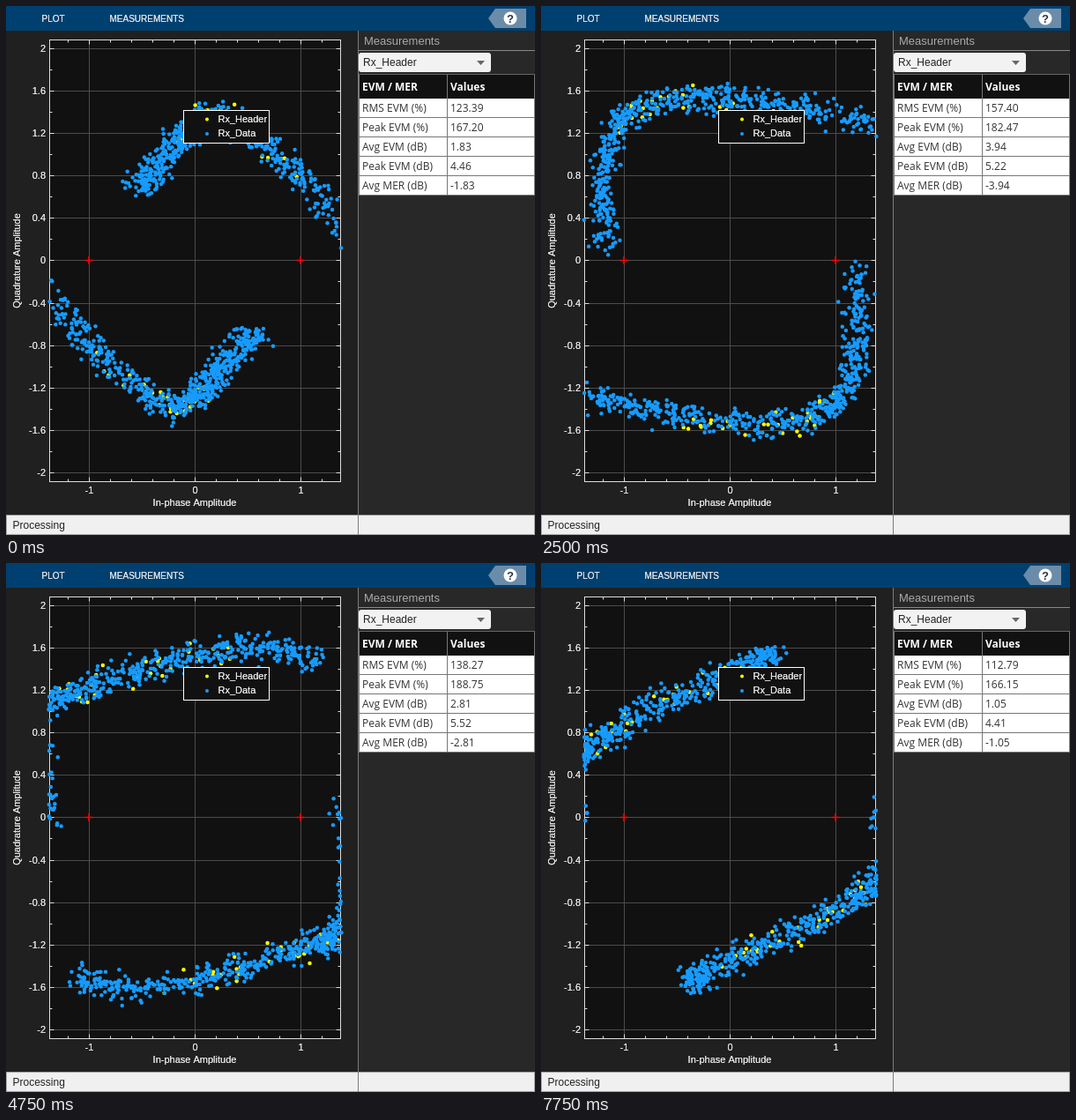
Write an HTML page with a canvas that moves like this. It is 600 by 600 pixels and loops after 8 s.

```html
<!DOCTYPE html>
<html>
<head>
<meta charset="utf-8">
<style>
  html, body { margin: 0; width: 100%; height: 100%; overflow: hidden; background: #202020; }
  canvas { display: block; }
</style>
</head>
<body>
<canvas id="stage" width="600" height="600"></canvas>
<script>
const ctx = document.getElementById('stage').getContext('2d');
const ARIAL = '"Liberation Sans", Arial, sans-serif';
const OPEN = '"Open Sans", "Noto Sans", sans-serif';
const BLUE = '#179bff', YELLOW = '#ffff00';
const STEP = 250, STEPS = 32;
const LEFT = 49.5, RIGHT = 379.5, TOP = 38.5, BOTTOM = 539.5;
const CX = 214.4, CY = 288.95, UNIT_X = 120, UNIT_Y = 120.2;

// Each pose: step, RMS EVM, peak EVM, then the upper arc as x, y pairs.
const poses = [
  { at: 0, rms: 123.39, peak: 167.20, arc: [147,204, 170,186, 193,154, 218,134, 246,125, 300,163, 350,212, 402,285] },
  { at: 4, rms: 150.42, peak: 187.83, arc: [112,218, 130,185, 152,138, 182,107, 222,103, 275,126, 340,172, 420,212] },
  { at: 10, rms: 157.40, peak: 182.47, arc: [74,272, 70,210, 78,155, 110,118, 175,104, 245,110, 320,122, 405,142] },
  { at: 15, rms: 145.96, peak: 186.30, arc: [56,298, 53,225, 57,160, 90,132, 160,117, 230,102, 300,95, 370,120] },
  { at: 19, rms: 138.27, peak: 188.75, arc: [46,298, 38,225, 48,160, 85,145, 150,122, 220,104, 290,95, 347,108] },
  { at: 23, rms: 135.06, peak: 183.64, arc: [46,290, 36,225, 46,170, 85,153, 150,130, 215,110, 275,100, 336,116] },
  { at: 31, rms: 112.79, peak: 166.15, arc: [43,290, 26,250, 42,222, 72,198, 125,166, 185,140, 240,113, 263,106] }
];

const mix = (a, b, t) => a + (b - a) * t;

function poseAt(step) {
  const i = Math.max(1, poses.findIndex(p => p.at >= step));
  const a = poses[i - 1], b = poses[i], t = (step - a.at) / (b.at - a.at);
  return {
    rms: mix(a.rms, b.rms, t),
    peak: mix(a.peak, b.peak, t),
    arc: a.arc.map((v, k) => mix(v, b.arc[k], t))
  };
}

function randomFrom(seed) {
  return () => {
    seed = (seed + 0x6D2B79F5) | 0;
    let t = Math.imul(seed ^ (seed >>> 15), 1 | seed);
    t = (t + Math.imul(t ^ (t >>> 7), 61 | t)) ^ t;
    return ((t ^ (t >>> 14)) >>> 0) / 4294967296;
  };
}

// Catmull-Rom position along the arc; axis is 0 for x, 1 for y.
function along(arc, u, axis) {
  const last = arc.length / 2 - 1;
  const i = Math.min(last - 1, Math.floor(u * last)), t = u * last - i;
  const [a, b, c, d] = [-1, 0, 1, 2].map(k => arc[2 * Math.min(last, Math.max(0, i + k)) + axis]);
  return b + t / 2 * (c - a + t * (2 * a - 5 * b + 4 * c - d + t * (3 * (b - c) + d - a)));
}

function rect(x, y, w, h, color) {
  ctx.fillStyle = color;
  ctx.fillRect(x, y, w, h);
}

function line(x1, y1, x2, y2, color, width = 1) {
  ctx.strokeStyle = color;
  ctx.lineWidth = width;
  ctx.beginPath();
  ctx.moveTo(x1, y1);
  ctx.lineTo(x2, y2);
  ctx.stroke();
}

function dot(x, y, r, color) {
  ctx.fillStyle = color;
  ctx.beginPath();
  ctx.arc(x, y, r, 0, 7);
  ctx.fill();
}

function polygon(color, ...points) {
  ctx.fillStyle = color;
  ctx.beginPath();
  points.forEach(p => ctx.lineTo(...p));
  ctx.fill();
}

function text(str, x, y, font, color, align = 'left') {
  ctx.font = font;
  ctx.fillStyle = color;
  ctx.textAlign = align;
  ctx.fillText(str, x, y);
}

// Light labels look slightly heavier than plain text.
function label(str, x, y, align = 'left', size = 11) {
  text(str, x, y, size + 'px ' + ARIAL, '#e4e4e4', align);
  ctx.fillText(str, x, y);
}

function drawAxes() {
  rect(LEFT, TOP, RIGHT - LEFT, BOTTOM - TOP, '#111');
  const snap = v => Math.floor(v) + 0.5;
  for (let i = -6; i <= 6; i++) {
    const x = snap(CX + i * UNIT_X / 5), major = i % 5 === 0, len = major ? 5 : 3;
    if (major) {
      line(x, TOP, x, BOTTOM, '#4c4c4c');
      label(i / 5, x, 553, 'center');
    }
    line(x, TOP, x, TOP + len, '#ddd');
    line(x, BOTTOM, x, BOTTOM - len, '#ddd');
  }
  for (let i = -10; i <= 10; i++) {
    const y = snap(CY - i * UNIT_Y / 5), major = i % 2 === 0, len = major ? 5 : 3;
    if (major) {
      line(LEFT, y, RIGHT, y, '#4c4c4c');
      label(+(i / 5).toFixed(1), 45, y + 3.5, 'right');
    }
    line(LEFT, y, LEFT + len, y, '#ddd');
    line(RIGHT, y, RIGHT - len, y, '#ddd');
  }
  ctx.strokeStyle = '#ddd';
  ctx.strokeRect(LEFT, TOP, RIGHT - LEFT, BOTTOM - TOP);
  label('In-phase Amplitude', 214, 567, 'center');
  ctx.save();
  ctx.translate(16, 289);
  ctx.rotate(-Math.PI / 2);
  label('Quadrature Amplitude', 0, 0, 'center');
  ctx.restore();
}

function drawDots(arc, step) {
  const random = randomFrom(step * 977 + 5);
  const noise = () => (random() + random() + random() + random() - 2) * 13.5;
  const scatter = (count, from, to, color) => {
    for (let i = 0; i < count; i++) {
      const u = mix(from, to, random());
      let x = along(arc, u, 0) + noise(), y = along(arc, u, 1) + noise();
      if (i % 2) {
        x = 2 * CX - x;
        y = 2 * CY - y;
      }
      if (x > LEFT - 1 && x < RIGHT + 1) dot(x, y, 2.25, color);
    }
  };
  scatter(64, 0.33, 0.8, YELLOW);
  scatter(1240, 0, 1, BLUE);
}

function drawLegend() {
  rect(201.5, 118.5, 97, 37, '#111');
  ctx.strokeStyle = '#fff';
  ctx.lineWidth = 1;
  ctx.strokeRect(201.5, 118.5, 97, 37);
  dot(228, 128.5, 2, YELLOW);
  dot(228, 145, 2, BLUE);
  label('Rx_Header', 240.5, 132);
  label('Rx_Data', 240.5, 148);
}

function drawFrame() {
  rect(0, 0, 600, 600, '#202020');
  rect(400, 28, 200, 549, '#282828');
  rect(0, 0, 600, 28, '#004070');
  label('PLOT', 40.5, 18, 'left', 10);
  label('MEASUREMENTS', 117.5, 18, 'left', 10);
  polygon('#6b8ca8', [547, 14], [555, 3], [590, 3], [590, 25], [555, 25]);
  dot(572, 14, 7.5, '#fff');
  text('?', 572, 18.5, 'bold 13px ' + ARIAL, '#23384c', 'center');

  rect(0, 577, 600, 23, '#f0f0f0');
  ctx.strokeStyle = '#a0a0a0';
  ctx.lineWidth = 1;
  ctx.strokeRect(0.5, 577.5, 599, 22);
  text('Processing', 7.5, 593, '12px ' + ARIAL, '#222');
  line(399.5, 28, 399.5, 600, '#7c7c7c');
}

function drawPanel({ rms, peak }) {
  text('Measurements', 406, 44, '13px ' + ARIAL, '#aaa');
  line(400, 50.5, 600, 50.5, '#888');
  ctx.beginPath();
  ctx.roundRect(400, 53, 150, 22, 3);
  ctx.fillStyle = '#f2f2f2';
  ctx.fill();
  text('Rx_Header', 405, 68, '12px ' + ARIAL, '#222');
  polygon('#666', [534, 62], [543, 62], [538.5, 67]);

  const decibels = v => (20 * Math.log10(v / 100)).toFixed(2);
  const rows = [
    ['RMS EVM (%)', rms.toFixed(2)],
    ['Peak EVM (%)', peak.toFixed(2)],
    ['Avg EVM (dB)', decibels(rms)],
    ['Peak EVM (dB)', decibels(peak)],
    ['Avg MER (dB)', '-' + decibels(rms)]
  ];
  rect(401, 78, 199, 27, '#111');
  rect(401, 105, 198, 110, '#fff');
  line(400, 77.5, 600, 77.5, '#666');
  text('EVM / MER', 404, 96, 'bold 12px ' + OPEN, '#fff');
  text('Values', 504, 96, 'bold 12px ' + OPEN, '#fff');
  rows.forEach(([name, value], i) => {
    const y = 105 + i * 22;
    text(name, 404, y + 15, '12px ' + OPEN, '#333');
    text(value, 504, y + 15, '12px ' + OPEN, '#333');
    line(401, y + 21.5, 599, y + 21.5, '#777');
  });
  for (const x of [400.5, 500.5, 599.5]) line(x, 78, x, 215, '#777');
}

function draw(step) {
  const pose = poseAt(step);
  drawFrame();
  drawAxes();
  for (const x of [94, 334]) {
    line(x - 4.5, 288.5, x + 4.5, 288.5, '#f00', 1.5);
    line(x, 284, x, 293, '#f00', 1.5);
  }
  drawDots(pose.arc, step);
  drawLegend();
  drawPanel(pose);
}

let shown = -1;
function tick() {
  const step = Math.floor(performance.now() / STEP) % STEPS;
  if (step !== shown) draw(shown = step);
  requestAnimationFrame(tick);
}
tick();
</script>
</body>
</html>
```
